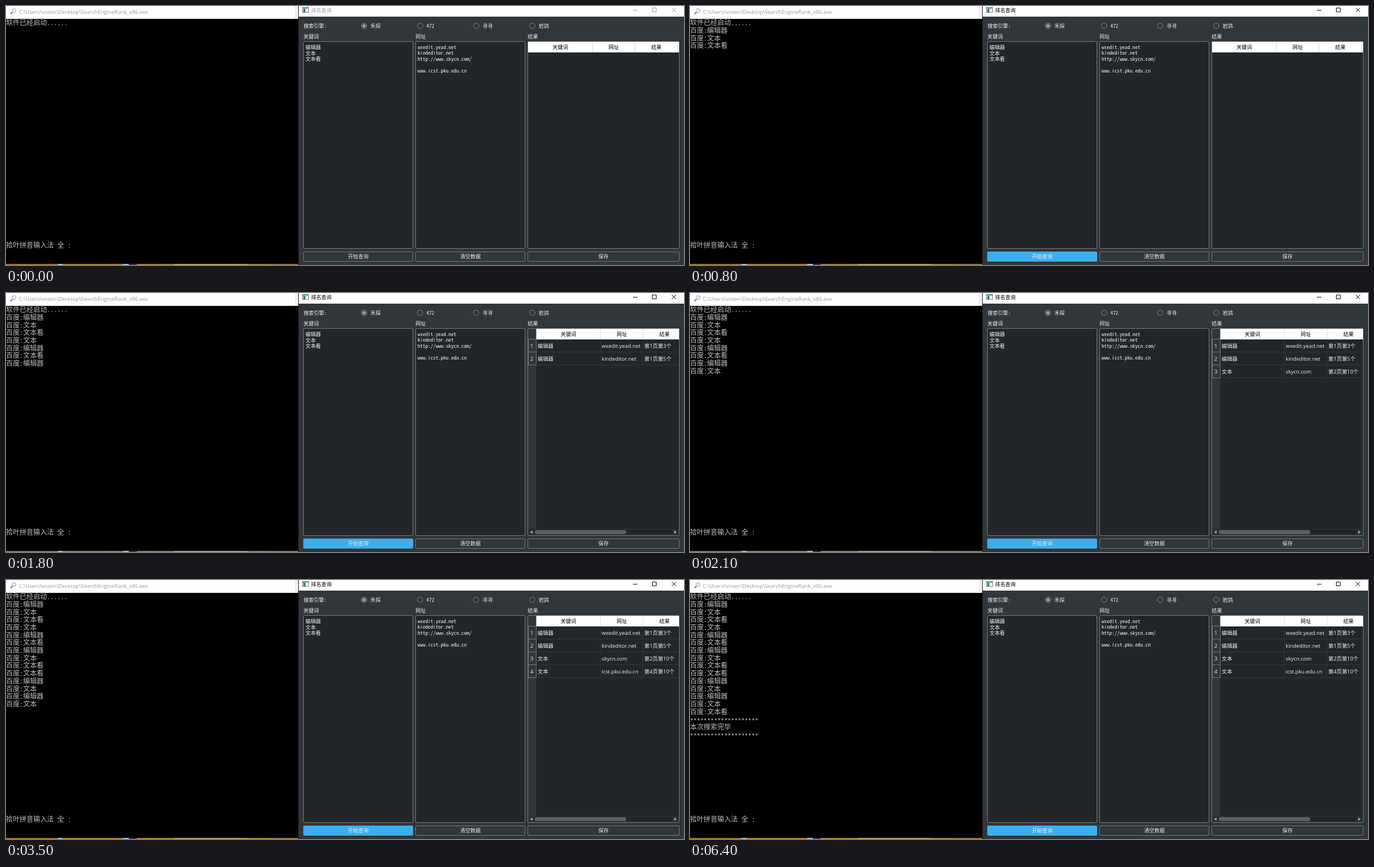
An HTML page for the animation above (8 s loop, 1209 px wide and 463 px high).

```html
<!DOCTYPE html>
<html lang="zh-CN">
<head>
<meta charset="utf-8">
<title>排名查询</title>
<style>
html, body { margin: 0; width: 100%; height: 100%; overflow: hidden; background: #000; }
svg { display: block; width: 100%; height: 100%; }
text { white-space: pre; }
.con { font: 12.2px "Noto Sans Mono CJK SC", "Noto Sans CJK SC", "Noto Sans CJK", monospace; fill: #c0c0c0; }
.ui { font: 9.2px "Noto Sans Mono CJK SC", "Noto Sans CJK SC", "Noto Sans CJK", monospace; fill: #eff0f1; }
.cell { font: 9.4px "Open Sans", "Noto Sans CJK SC", "Noto Sans CJK", sans-serif; fill: #eff0f1; }
.mid { text-anchor: middle; }
</style>
</head>
<body>
<svg id="stage" viewBox="0 0 1209 463" preserveAspectRatio="none"></svg>
<script>
const LOOP = 8000;
const BLUE = '#3daee9', GREY = '#76797c', PANEL = '#31363b', FIELD = '#232629';
const stage = document.getElementById('stage');

function add(tag, attrs, parent = stage) {
  const el = document.createElementNS('http://www.w3.org/2000/svg', tag);
  for (const k in attrs) el.setAttribute(k, attrs[k]);
  return parent.appendChild(el);
}
const rect = (x, y, width, height, fill, parent, more) =>
  add('rect', { x, y, width, height, fill, ...more }, parent);
const path = (d, stroke, parent, more) =>
  add('path', { d, stroke, fill: 'none', ...more }, parent);
// y is the middle of the line of text
function text(str, x, y, cls, parent, more) {
  const size = cls.includes('con') ? 12.2 : 9.2;
  const el = add('text', { x, y: y + size * 0.38, class: cls, ...more }, parent);
  el.textContent = str;
  return el;
}
const box = (x, y, w, h, fill) =>
  rect(x + .5, y + .5, w, h, fill, stage, { rx: 1.5, stroke: GREY });

// Console window
rect(0, 0, 521, 23, '#fff');
rect(515, 0, 6, 23, '#f0f0f0');
rect(0, 23, 521, 438, '#000');
path('M8 14.5L11.5 11', '#b5563c', stage, { 'stroke-width': 2 });
add('circle', { cx: 14.3, cy: 8.3, r: 3.7, fill: '#d5f0f7', stroke: '#8fb4c0' });
text('C:\\Users\\vosen\\Desktop\\SearchEngineRank_x86.exe', 23, 10.3, 'cell', stage,
  { style: 'fill:#999;font-size:9.5px' });
text('拾叶拼音输入法 全 :', 0, 427.4, 'con');

// Sliver of desktop below the console
rect(0, 461, 521, 2, '#a57c35');
[[0, 90, '#9a6f2a'], [93, 8, '#a9c8dc'], [209, 10, '#a9c8dc'],
 [219, 14, '#4a2358'], [300, 130, '#b99c63'], [470, 51, '#937343']]
  .forEach(([x, w, c]) => rect(x, 461, w, 2, c));

const log = '编辑器 文本 文本看 文本 编辑器 文本看 编辑器 文本 文本看 文本看 编辑器 文本 编辑器 文本 文本看'
  .split(' ').map(s => '百度:' + s);
const stars = '*'.repeat(20);
const lines = ['软件已经启动......', ...log, stars, '本次搜索完毕', stars];
const lineTimes = [0, 800, 800, 800, 1400, 1400, 1600, 1800, 2100, 2200, 2600, 2800, 3000,
  3400, 3500, 5900, 6400, 6400, 6400];
// Asterisks sit high in the font, so lower them to the middle of the line
const timed = lines.map((s, i) =>
  [text(s, 0, 29.5 + 13.7 * i + (s === stars ? 3.3 : 0), 'con'), lineTimes[i]]);

// Query window
rect(521, 0, 688, 463, PANEL);
rect(522, 0, 687, 19, '#fff');
rect(521, 0, 1, 463, '#17191b');
rect(528.5, 2.5, 11, 9, '#fff', stage, { stroke: '#777' });
rect(529, 3, 10, 2, '#9aa4ad');
rect(530, 5, 4, 6, '#2b8a7c');
const caption = text('排名查询', 544, 7.3, 'ui');
const controls = path('M1118 7.5h8M1152.5 3.5h7v7h-7zM1187.3 3.3l7.6 7.6M1194.9 3.3l-7.6 7.6', '#999');

text('搜索引擎:', 530.5, 35.8, 'ui');
['禾探', '472', '寻寻', '岩鸽'].forEach((name, i) => {
  const cx = 638.5 + 100 * i;
  add('circle', { cx, cy: 35.4, r: 4.8, fill: 'none', stroke: i ? '#85888b' : '#a0a2a4' });
  if (!i) add('circle', { cx, cy: 35.4, r: 3, fill: '#a0a2a4' });
  text(name, cx + 11.3, 35.3, 'ui');
});
['关键词', '网址', '结果'].forEach((s, i) => text(s, 530.3 + 200 * i, 54.5, 'ui'));

const words = box(530, 63, 195, 370, FIELD);
const sites = box(730, 63, 195, 370, FIELD);
box(930, 63, 270, 370, FIELD);
['编辑器', '文本', '文本看'].forEach((s, i) => text(s, 534, 73.6 + 10.7 * i, 'ui'));
['wxedit.yead.net', 'kindeditor.net', 'http://www.skycn.com/', '', 'www.icst.pku.edu.cn']
  .forEach((s, i) => text(s, 734, 73.2 + 10.7 * i, 'ui'));

const start = box(530, 439, 195, 17, PANEL);
box(730, 439, 195, 17, PANEL);
box(930, 439, 270, 17, PANEL);
['开始查询', '清空数据', '保存'].forEach((s, i) =>
  text(s, [628, 828, 1065.5][i], 448, 'ui mid'));

// Result table
function header(left, parent) {
  rect(left, 64, 1200 - left, 19, '#fff', parent);
  ['关键词', '网址', '结果'].forEach((s, i) =>
    text(s, left + [57.3, 152.7, 228.7][i], 73.5, 'ui mid', parent, { style: 'fill:#000' }));
  [114.5, 190.5, 266.5].forEach(dx => {
    if (left + dx < 1200) path(`M${left + dx} 64v19`, '#dcdcdc', parent);
  });
}
const empty = add('g', {});
header(931, empty);

const filled = add('g', {});
rect(931, 64, 14.5, 358, PANEL, filled);
header(945.5, filled);
rect(931, 421.5, 269, 11.5, '#2a2e32', filled);
rect(943, 424, 245, 7, '#232323', filled, { rx: 3.5 });
rect(943, 424, 163, 7, '#605f5f', filled, { rx: 3.5 });
add('path', { d: 'M939 424.5v6l-4.5-3zM1191.5 424.5v6l4.5-3z', fill: '#a5a7a9' }, filled);

[['编辑器', 'wxedit.yead.net', '第1页第3个', 1400],
 ['编辑器', 'kindeditor.net', '第1页第5个', 1400],
 ['文本', 'skycn.com', '第2页第10个', 2100],
 ['文本', 'icst.pku.edu.cn', '第4页第10个', 3500]].forEach(([word, site, place, at], i) => {
  const g = add('g', {});
  const top = 83 + Math.round(22.9 * i), mid = top + 11.5;
  rect(931.5, top - .5, 14, 23, PANEL, g, { stroke: GREY });
  path(`M946 ${top + 22.5}H1200M1059.5 ${top}v23M1135.5 ${top}v23`, PANEL, g);
  text(i + 1, 937.7, mid, 'cell mid', g);
  [word, site, place].forEach((s, k) => text(s, [948, 1062.3, 1138.3][k], mid, 'cell', g));
  timed.push([g, at]);
});
timed.push([filled, 1400]);

const show = (el, on) => el.setAttribute('visibility', on ? 'visible' : 'hidden');
const within = (t, a, b) => t >= a && t < b;

function draw(t) {
  timed.forEach(([el, at]) => show(el, t >= at));
  show(empty, t < 1400);
  sites.setAttribute('stroke', within(t, 100, 400) ? BLUE : GREY);
  words.setAttribute('stroke', within(t, 400, 500) ? BLUE : GREY);
  start.setAttribute('stroke', t >= 500 ? BLUE : GREY);
  start.setAttribute('fill', t >= 700 ? BLUE : PANEL);
  const ink = t >= 700 ? '#000' : '#999';
  caption.style.fill = ink;
  controls.setAttribute('stroke', ink);
}

const begin = performance.now();
function tick() {
  draw((performance.now() - begin) % LOOP);
  requestAnimationFrame(tick);
}
tick();
</script>
</body>
</html>
```
